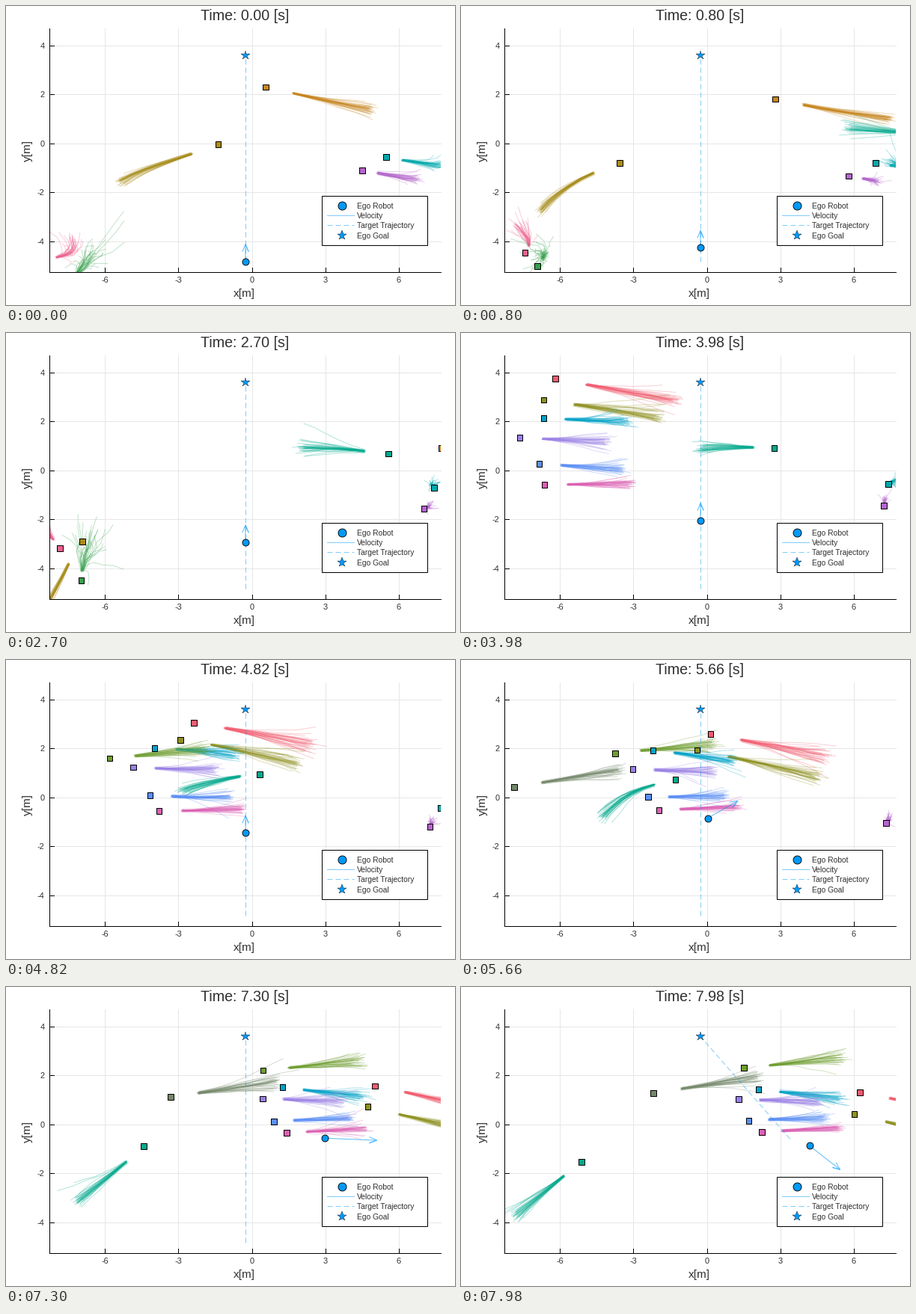
Write a matplotlib script that moves like this. It is 600x400 px and loops after 8 s.

```python
import numpy as np
import matplotlib.pyplot as plt
from matplotlib.animation import FuncAnimation
from matplotlib.collections import LineCollection
from matplotlib.patches import Rectangle

W, H, DPI = 600, 400, 100
PX = 72 / DPI                      # points per pixel
FRAMES, DT = 400, 0.02
STEP = 20                          # frames between pedestrian updates
LEFT, RIGHT, TOP, BOTTOM = 58.3, 581.5, 30, 356.3
UNIT, X0, Y0 = 32.75, 329, 184.2
BLUE, INK = "#009af9", "#303030"
START, GOAL = (320.5, 342), (320.5, 66.5)
REPLAN = 7.5
SENSOR_X = 70                      # the crowd is noticed from here on

plt.rcParams["font.family"] = "Liberation Sans"
fig = plt.figure(figsize=(W / DPI, H / DPI), dpi=DPI, facecolor="white")
ax = fig.add_axes([0, 0, 1, 1])
ax.set_xlim(0.5, W + 0.5)
ax.set_ylim(H + 0.3, 0.3)
ax.axis("off")
area = Rectangle((LEFT, TOP), RIGHT - LEFT, BOTTOM - TOP, fc="none", ec="none")
ax.add_patch(area)


def line(xs, ys, color="black", z=1, **kw):
    return ax.plot(xs, ys, color=color, lw=PX, zorder=z, **kw)[0]


def label(x, y, s, px, ha="center", **kw):
    return ax.text(x, y, s, fontsize=px * PX, color=INK, ha=ha, zorder=10,
                   **{"va": "baseline", **kw})


def mark(x, y, shape, size, z, edge=0.9):
    return ax.plot([x], [y], shape, ms=size * PX, mfc=BLUE, mec="black",
                   mew=edge * PX, zorder=z)[0]


def hermite(t, T, P, V):
    """Position and velocity on a cubic path, straight beyond its ends."""
    if t < T[0] or t > T[-1]:
        e = 0 if t < T[0] else -1
        return P[e] + V[e] * (t - T[e]), V[e]
    k = min(np.searchsorted(T, t, "right") - 1, len(T) - 2)
    h = T[k + 1] - T[k]
    u = (t - T[k]) / h
    d = P[k + 1] - P[k]
    a, b = h * V[k] - d, d - h * V[k + 1]
    mix = (1 - u) * a + u * b
    pos = P[k] + u * d + u * (1 - u) * mix
    vel = d + (1 - 2 * u) * mix + u * (1 - u) * (b - a)
    return pos, vel / h


# ---- pedestrians -------------------------------------------------------
class Walker:
    def __init__(self, color, spread, *keys, crowd=False):
        """Keys are (step, x, y) points on the walk."""
        keys = np.array(keys, float)
        self.color, self.spread, self.crowd = color, spread, crowd
        self.T, self.P = keys[:, 0], keys[:, 1:]
        self.V = np.gradient(self.P, self.T, axis=0)

    def at(self, step):
        return hermite(step, self.T, self.P, self.V)[0]

    def seen(self, step):
        if self.crowd:
            return self.at(step)[0] > SENSOR_X
        return self.T[0] <= step <= self.T[-1]

    def fan(self, step, rng, n=34):
        """Sampled predictions of the next steps, drifting apart."""
        u = np.linspace(0, 1, 6)[:, None]
        mid = np.array([self.at(step + 1 + 2.8 * q) for q in u[:, 0]])
        first = rng.normal(size=(n, 1, 2)) * 0.9
        aim = rng.normal(size=(n, 1, 2)) * rng.gamma(2, 0.5, (n, 1, 1))
        walk = np.cumsum(rng.normal(size=(n, 6, 2)), axis=1) * np.sqrt(u)
        return mid + first + self.spread / 2 * (0.8 * aim * u ** 1.4 + 0.24 * walk)


def crossing(color, spread, *points):
    keys = [(s, *p) for s, p in zip((9, 14, 19), points)]
    return Walker(color, spread, *keys, crowd=True)


walkers = [
    Walker("#c8861e", 7, (0, 347.5, 109), (4, 497, 140), (6, 582, 154)),
    Walker("#a98d19", 6, (0, 284, 185.5), (4, 148, 239.5), (6, 102.5, 279.5),
           (8, 68, 341)),
    Walker("#b566cc", 8, (0, 476.5, 220), (4, 550.5, 233.5), (6, 559, 235),
           (14, 568.5, 218.5)),
    Walker("#00a9ad", 10, (0, 508.5, 202.5), (4, 584, 214), (6, 572.5, 207),
           (9, 571.5, 202), (14, 590, 196)),
    Walker("#00a98d", 9, (2, 645, 172), (4, 577, 168), (9, 419, 154),
           (14, 287, 160.5), (16, 231.5, 177), (19, 161.5, 234)),
    Walker("#ee5f8c", 15, (0, 46, 342), (2, 86, 330), (4, 89.5, 311.5),
           (6, 72.5, 288)),
    Walker("#34a04a", 28, (0, 86, 372), (4, 111.5, 331.5), (6, 101, 331.5),
           (8, 104, 302)),
    Walker("#ee8372", 14, (3, 4, 38), (5, 40, 38)),
    crossing("#f25c70", 13, (126.5, 61.5), (334, 99.5), (533.5, 141)),
    crossing("#8f9120", 13, (111, 90), (316, 121), (526, 170.5)),
    crossing("#00a3c8", 11, (111, 114.5), (257, 121.5), (398, 137.5)),
    crossing("#9a80e6", 10, (79, 140.5), (230, 146), (371.5, 150.5)),
    crossing("#5b8ff5", 8, (105, 175.5), (250.5, 183.5), (385, 179)),
    crossing("#dc60b4", 8, (112, 203), (265, 201), (402.5, 194)),
    crossing("#6f9e30", 11, (39, 142), (206.5, 125), (378.5, 108.5)),
    crossing("#74886a", 11, (-114, 200), (71.5, 170), (257.5, 142)),
]


def scene(step):
    rng = np.random.default_rng(step)
    seen = [w for w in walkers if w.seen(step)]
    fans = [w.fan(step, rng) for w in seen]
    tints = [w.color for w, f in zip(seen, fans) for _ in f]
    return ([w.at(step) for w in seen], [w.color for w in seen],
            np.concatenate(fans), tints)


scenes = [scene(s) for s in range(FRAMES // STEP)]

# ---- robot: times, positions and velocities along its path ---------------
T = np.array([0, 5.18, 5.66, 6.7, 7.98])
P = np.array([START, (320.5, 223.4), (330, 212), (384.5, 201.5), (466, 212.5)])
V = np.array([(0, -22.9), (0, -22.9), (40, -23), (68, 5), (41, 32)])

# ---- axes ----------------------------------------------------------------
for m in range(-6, 7, 3):
    x = X0 + UNIT * m
    line([x, x], [TOP, BOTTOM], "#e6e6e6", 0)
    line([x, x], [BOTTOM, BOTTOM - 6], z=6)
    label(x, 370.5, str(m), 11)
for m in range(-4, 5, 2):
    y = Y0 - UNIT * m
    line([LEFT, RIGHT], [y, y], "#e6e6e6", 0)
    line([LEFT, LEFT + 6], [y, y], z=6)
    label(52, y + 4, str(m), 11, "right")
line([LEFT, LEFT], [TOP, BOTTOM], z=6)
line([LEFT, RIGHT], [BOTTOM, BOTTOM], z=6)
title = label(319.5, 19, "", 19.7)
label(319.2, 389.7, "x[m]", 15.4)
label(29, 193.5, "y[m]", 15.4, rotation=90, va="center")

# ---- legend --------------------------------------------------------------
ax.add_patch(Rectangle((422.5, 254.2), 140.5, 66, fc="white", ec="black",
                       lw=PX, zorder=8))
DASH = (0, (7, 4))
line([429, 465], [280.3, 280.3], BLUE, 9, alpha=0.5)
line([429, 465], [293.3, 293.3], BLUE, 9, alpha=0.5, ls=DASH)
mark(449.5, 267.3, "o", 11, 9)
mark(449.5, 307.3, "*", 13.5, 9, 0.4)
for i, s in enumerate(("Ego Robot", "Velocity", "Target Trajectory", "Ego Goal")):
    label(469.3, 271 + 13.3 * i, s, 10.2, "left")

# ---- moving parts --------------------------------------------------------
fans = LineCollection([], linewidths=PX, alpha=0.3, zorder=2)
ax.add_collection(fans)
squares = ax.scatter([], [], s=(7.6 * PX) ** 2, marker="s", edgecolors="black",
                     linewidths=PX, zorder=5)
for part in (fans, squares):
    part.set_clip_path(area)
route = line([], [], BLUE, 3, alpha=0.5, ls=DASH)
arrow = line([], [], BLUE, 3, alpha=0.65)
robot = mark(*START, "o", 9, 5)
mark(*GOAL, "*", 12, 5, 0.4)
new_start = hermite(REPLAN, T, P, V)[0]


def update(i):
    t = i * DT
    title.set_text(f"Time: {t:.2f} [s]")

    spots, fills, rays, tints = scenes[i // STEP]
    squares.set_offsets(spots)
    squares.set_facecolor(fills)
    fans.set_segments(rays)
    fans.set_color(tints)

    a = START if t < REPLAN else new_start
    route.set_data([a[0], GOAL[0]], [a[1], GOAL[1]])

    pos, vel = hermite(t, T, P, V)
    tip = pos + vel
    back = 9.5 * vel / np.hypot(*vel)
    side = 0.42 * np.array([-back[1], back[0]])
    path = np.array([pos, tip, tip - back + side, tip, tip - back - side])
    arrow.set_data(path[:, 0], path[:, 1])
    robot.set_data([pos[0]], [pos[1]])
    return title, squares, fans, route, arrow, robot


anim = FuncAnimation(fig, update, frames=FRAMES, interval=1000 * DT,
                     repeat=True, repeat_delay=0)
plt.show()
```
